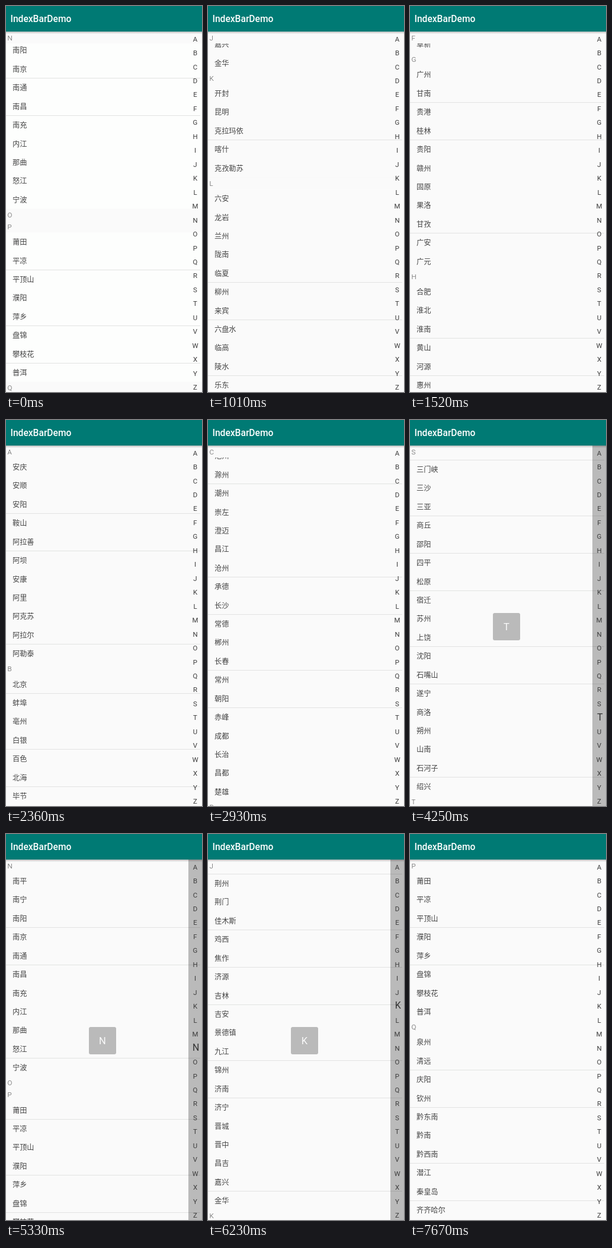
Recreate the animation shown at these times as an HTML page with a canvas. Size 331 by 650 pixels, loop 8 s.

```html
<!DOCTYPE html>
<html lang="zh">
<head>
<meta charset="utf-8">
<title>IndexBarDemo</title>
<style>
  html, body { margin: 0; width: 100%; height: 100%; overflow: hidden; background: #fafafa; }
  canvas { display: block; width: 331px; height: 650px; }
</style>
</head>
<body>
<canvas id="stage"></canvas>
<script>
const W = 331, H = 650, LOOP = 8000;
const TOP = 43, HEAD = 20, ROW = 31.42, BOTTOM_GAP = 589.6;
const LATIN = 'Roboto, sans-serif';
const CJK = '"Noto Sans CJK SC", "Noto Sans CJK", sans-serif';
const ALPHABET = 'ABCDEFGHIJKLMNOPQRSTUVWXYZ';

const cities = {
  A: '安庆 安顺 安阳 鞍山 阿拉善 阿坝 安康 阿里 阿克苏 阿拉尔 阿勒泰',
  B: '北京 蚌埠 亳州 白银 百色 北海 毕节 白沙 保亭 保定 白城 白山 本溪 包头 巴彦淖尔 滨州 宝鸡 巴中 保山',
  C: '重庆 池州 滁州 潮州 崇左 澄迈 昌江 沧州 承德 长沙 常德 郴州 长春 常州 朝阳 赤峰 成都 长治 昌都 楚雄',
  D: '东莞 定西 大庆 大兴安岭 儋州 定安县 东方 大连 丹东 达州 东营 德州 大同 德阳 迪庆 大理 德宏',
  E: '鄂州 恩施 鄂尔多斯',
  F: '阜阳 福州 佛山 防城港 抚州 抚顺 阜新',
  G: '广州 甘南 贵港 桂林 贵阳 赣州 固原 果洛 甘孜 广安 广元',
  H: '合肥 淮北 淮南 黄山 河源 惠州 贺州 河池 海口 邯郸 衡水 鹤壁 哈尔滨 鹤岗 黑河 黄石 黄冈 衡阳 怀化 淮安 葫芦岛 呼和浩特 呼伦贝尔 海东 海北 黄南 海西 菏泽 汉中 红河 哈密 和田 杭州 湖州',
  I: '',
  J: '金昌 酒泉 嘉峪关 江门 揭阳 荆州 荆门 佳木斯 鸡西 焦作 济源 吉林 吉安 景德镇 九江 锦州 济南 济宁 晋城 晋中 昌吉 嘉兴 金华',
  K: '开封 昆明 克拉玛依 喀什 克孜勒苏',
  L: '六安 龙岩 兰州 陇南 临夏 柳州 来宾 六盘水 临高 陵水 乐东 廊坊 洛阳 漯河 娄底 辽源 连云港 辽阳 临沂 聊城 吕梁 临汾 泸州 乐山 凉山 拉萨 林芝 丽江 临沧 丽水',
  M: '马鞍山 茂名 梅州 牡丹江 绵阳 眉山',
  N: '南平 南宁 南阳 南京 南通 南昌 南充 内江 那曲 怒江 宁波',
  O: '',
  P: '莆田 平凉 平顶山 濮阳 萍乡 盘锦 攀枝花 普洱',
  Q: '泉州 清远 庆阳 钦州 黔东南 黔南 黔西南 潜江 秦皇岛 齐齐哈尔 七台河 琼海 琼中 青岛 曲靖 衢州',
  R: '日照 日喀则',
  S: '上海 宿州 三明 深圳 汕头 韶关 汕尾 石家庄 双鸭山 绥化 十堰 随州 三门峡 三沙 三亚 商丘 邵阳 四平 松原 宿迁 苏州 上饶 沈阳 石嘴山 遂宁 商洛 朔州 山南 石河子 绍兴',
  T: '天津 铜陵 天水 铜仁 唐山 通化 泰州 铁岭'
};

const offset = {};
const sections = [];
let listHeight = 0;
for (const [letter, names] of Object.entries(cities)) {
  const rows = names ? names.split(' ') : [];
  offset[letter] = listHeight;
  sections.push({ letter, rows, y: listHeight });
  listHeight += HEAD + rows.length * ROW;
}

const fling = p => 1 - (1 - p ** 1.5) ** 3;
const speedUp = p => p * p;
const slowDown = p => 1 - (1 - p) ** 2;

// Finger scrolling: start, end, from, to, easing
const swipes = [
  [800, 1520, offset.O - 298.2, offset.G - 36.4, fling],
  [1550, 2360, offset.G - 36.4, 0, fling],
  [2510, 3050, 0, offset.D - 566, fling],
  [3320, 3560, offset.D - 566, offset.D - 266, speedUp],
  [3560, 4100, offset.D - 266, offset.D + 409, slowDown]
];

// Dragging along the index bar: start, end, letters passed
const drags = [
  [4130, 4250, 'QRST'], [4850, 5000, 'SRQP'], [5180, 5180, 'O'],
  [5330, 5660, 'NMLK'], [5870, 6020, 'JIJ'], [6230, 6230, 'K'],
  [6470, 7220, 'LMNOPQRSRQP']
];
const RELEASE = 7340;

// Each touched letter scrolls just far enough to bring its header into view
const touches = [];
let jump = offset.D + 409;
for (const [from, to, letters] of drags)
  [...letters].forEach((letter, i) => {
    jump = Math.max(Math.min(jump, offset[letter]), offset[letter] - BOTTOM_GAP);
    const time = from + (to - from) * i / Math.max(1, letters.length - 1);
    touches.push({ time, letter, scroll: jump });
  });

function scrollAt(t) {
  let y = swipes[0][2];
  for (const [start, stop, a, b, ease] of swipes)
    if (t >= start) y = a + (b - a) * ease(Math.min(1, (t - start) / (stop - start)));
  return y;
}

const canvas = document.getElementById('stage');
const ctx = canvas.getContext('2d');
const ratio = window.devicePixelRatio || 1;
canvas.width = W * ratio;
canvas.height = H * ratio;
ctx.scale(ratio, ratio);

function rect(x, y, w, h, fill) {
  ctx.fillStyle = fill;
  ctx.fillRect(x, y, w, h);
}

function text(str, x, baseline, font, fill, align = 'left') {
  ctx.font = font;
  ctx.textAlign = align;
  ctx.fillStyle = fill;
  ctx.fillText(str, x, baseline);
}

function drawHeader(letter, y) {
  rect(0, y, W, HEAD, '#fafafa');
  text(letter, 2.5, y + 14.7, '300 11.5px ' + LATIN, '#505050');
}

function drawList(scroll) {
  let sticky;
  for (const { letter, rows, y } of sections) {
    const headY = TOP + y - scroll;
    if (headY <= TOP) sticky = { letter, y: TOP };
    else if (sticky && headY < TOP + HEAD) sticky.y = Math.min(sticky.y, headY - HEAD);
    if (headY > H) break;
    rows.forEach((name, i) => {
      const rowY = headY + HEAD + i * ROW;
      if (rowY < TOP - ROW || rowY > H) return;
      text(name, 11, rowY + 21, '12.2px ' + CJK, '#444');
      // Hairlines thinner than a pixel only show at some positions
      const lineY = rowY + ROW + 0.02, px = Math.floor(lineY);
      if (i < rows.length - 1 && lineY - px < 0.36) rect(0, px, 328, 1, '#e2e3e2');
    });
    drawHeader(letter, headY);
  }
  if (sticky) drawHeader(sticky.letter, sticky.y);
}

function drawIndex(active) {
  const shade = 'rgba(0, 0, 0, 0.26)';
  if (active) rect(308, TOP, W - 308, H - TOP, shade);
  [...ALPHABET].forEach((letter, i) => {
    const y = 55.6 + i * 23.46;
    if (letter === active) text(letter, 320.8, y + 4.2, '16px ' + LATIN, '#333', 'center');
    else text(letter, 319.5, y + 4, '11.5px ' + LATIN, '#3c3c3c', 'center');
  });
  if (!active) return;
  ctx.beginPath();
  ctx.roundRect(140, 325, 46, 46, 3);
  ctx.fillStyle = shade;
  ctx.fill();
  text(active, 163, 354, '16.5px ' + LATIN, '#fafafa', 'center');
}

function drawAppBar() {
  const shadow = ctx.createLinearGradient(0, TOP, 0, TOP + 4);
  shadow.addColorStop(0, 'rgba(0, 0, 0, 0.25)');
  shadow.addColorStop(1, 'rgba(0, 0, 0, 0)');
  rect(0, TOP, W, 4, shadow);
  rect(0, 0, W, TOP, '#007a74');
  text('IndexBarDemo', 7.5, 27.3, '500 15.6px ' + LATIN, '#fff');
}

function draw() {
  const t = performance.now() % LOOP;
  const touch = touches.filter(e => e.time <= t).pop();
  rect(0, 0, W, H, t < 500 ? '#fdfefd' : '#fafafa');
  drawList(touch ? touch.scroll : scrollAt(t));
  drawIndex(touch && t < RELEASE ? touch.letter : null);
  drawAppBar();
  requestAnimationFrame(draw);
}
draw();
</script>
</body>
</html>
```
